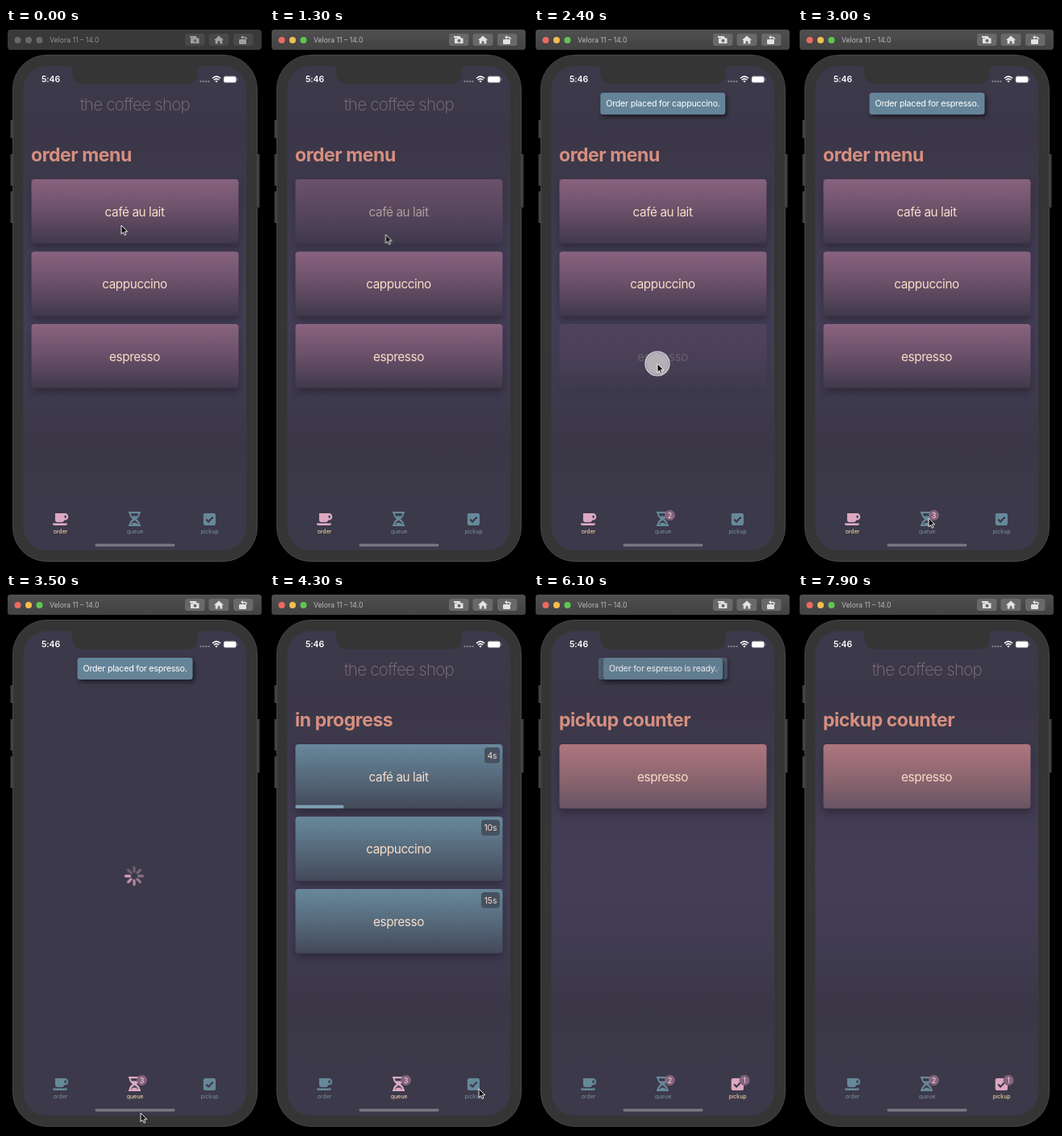
An HTML page for the animation above (8 s loop, 320 by 664 pixels).

```html
<!DOCTYPE html>
<html lang="en">
<head>
<meta charset="utf-8">
<title>the coffee shop</title>
<style>
html, body { margin: 0; width: 100%; height: 100%; overflow: hidden; background: #000; }
body { font-family: Inter, Roboto, sans-serif; }
.stage { position: absolute; left: 0; top: 0; width: 320px; height: 664px; overflow: hidden; }
svg { display: block; }

.brand { font-size: 20.5px; font-weight: 200; letter-spacing: -.7px; fill: #85737f; text-anchor: middle; }
.heading { font-size: 23px; font-weight: 700; letter-spacing: -.45px; fill: #d68f80; }
.card rect { filter: drop-shadow(0 5px 5px rgba(28, 24, 36, .5)); }
.card text { font-size: 15.3px; letter-spacing: -.4px; fill: #f8dcc8; text-anchor: middle; }
.timer rect { fill: #46515f; }
.timer text { font-size: 10.6px; letter-spacing: -.2px; fill: #f3dccb; text-anchor: middle; }
.tab { font-size: 7px; text-anchor: middle; }
.tab .icon { fill: var(--icon); }
.tab text { fill: var(--label); }
.off { --icon: #66899a; --label: #7792a3; }
.on { --icon: #dea8c2; --label: #eab988; }
.badge circle { fill: #85627e; }
.badge text { font-size: 9px; fill: #f6e4dc; text-anchor: middle; }
.toast {
  position: absolute; left: 160px; top: 80px; height: 27px; padding: 0 7px;
  transform: translateX(-50%); border-radius: 3.5px; background: #658498;
  box-shadow: 2px 3px 5px rgba(20, 17, 28, .75);
  font-size: 10.7px; line-height: 27px; letter-spacing: -.24px; white-space: nowrap; color: #fff; opacity: 0;
}

/* hard switches */
.sw { animation: 8s step-end infinite; opacity: 0; }
.focus { animation-name: focus; }
.at-order { animation-name: at-order; }
.at-queue { animation-name: at-queue; }
.at-pickup { animation-name: at-pickup; }
.loading { animation-name: loading; }
.list-queue { animation-name: list-queue; }
.list-pickup { animation-name: list-pickup; }
.one { animation-name: one; }
.two { animation-name: two; }
.three { animation-name: three; }
.queued { animation-name: queued; }
.ready { animation-name: ready; }
.five { animation-name: five; }
.four { animation-name: four; }
.touch { animation-name: touch; }
@keyframes focus { 0% { opacity: 0 } 12.5%, 100% { opacity: 1 } }
@keyframes at-order { 0% { opacity: 1 } 38.75%, 100% { opacity: 0 } }
@keyframes at-queue { 0% { opacity: 0 } 38.75% { opacity: 1 } 56.25%, 100% { opacity: 0 } }
@keyframes at-pickup { 0% { opacity: 0 } 56.25%, 100% { opacity: 1 } }
@keyframes loading { 0%, 47.5% { opacity: 0 } 38.75%, 56.25% { opacity: 1 } 63.75%, 100% { opacity: 0 } }
@keyframes list-queue { 0% { opacity: 0 } 47.5% { opacity: 1 } 56.25%, 100% { opacity: 0 } }
@keyframes list-pickup { 0% { opacity: 0 } 63.75%, 100% { opacity: 1 } }
@keyframes one { 0% { opacity: 0 } 17.5% { opacity: 1 } 26.25%, 100% { opacity: 0 } }
@keyframes two { 0%, 33.75% { opacity: 0 } 26.25%, 73.75%, 100% { opacity: 1 } }
@keyframes three { 0% { opacity: 0 } 33.75% { opacity: 1 } 73.75%, 100% { opacity: 0 } }
@keyframes queued { 0% { opacity: 0 } 17.5%, 100% { opacity: 1 } }
@keyframes ready { 0% { opacity: 0 } 73.75%, 100% { opacity: 1 } }
@keyframes five { 0% { opacity: 1 } 52.5%, 100% { opacity: 0 } }
@keyframes four { 0% { opacity: 0 } 52.5%, 100% { opacity: 1 } }
@keyframes touch {
  0%, 15%, 23.75%, 31.25%, 40% { opacity: 0 }
  12.5%, 21.25%, 28.75%, 38.1%, 55.6% { opacity: 1 }
  57.5%, 100% { opacity: 0 }
}

/* fades and motion */
.press1 { animation: press1 8s linear infinite; }
.press2 { animation: press2 8s linear infinite; }
.press3 { animation: press3 8s linear infinite; }
@keyframes press1 { 0%, 12.5%, 17.5%, 100% { opacity: 1 } 13.75%, 15% { opacity: .2 } }
@keyframes press2 { 0%, 21%, 26.25%, 100% { opacity: 1 } 22.4%, 23.75% { opacity: .2 } }
@keyframes press3 { 0%, 28.5%, 33.75%, 100% { opacity: 1 } 29.9%, 31.25% { opacity: .2 } }

.placed1 { animation: placed1 8s linear infinite; }
.placed2 { animation: placed2 8s linear infinite; }
.placed3 { animation: placed3 8s linear infinite; }
.done1 { animation: done1 8s linear infinite; }
.done2 { animation: done2 8s linear infinite; }
@keyframes placed1 { 0%, 16.25%, 29.5%, 100% { opacity: 0 } 20%, 25% { opacity: 1 } }
@keyframes placed2 { 0%, 25%, 37.5%, 100% { opacity: 0 } 28.75%, 32.5% { opacity: 1 } }
@keyframes placed3 { 0%, 32.5%, 48.75%, 100% { opacity: 0 } 36.25%, 45% { opacity: 1 } }
@keyframes done1 { 0%, 68.75%, 78.75%, 100% { opacity: 0 } 72.5%, 73.75% { opacity: 1 } }
@keyframes done2 { 0%, 73.1%, 87.5%, 100% { opacity: 0 } 77%, 82.5% { opacity: 1 } }

.progress { animation: progress 8s linear infinite; }
@keyframes progress { 0%, 47.5% { width: 31px } 56.25%, 100% { width: 71.5px } }
.spin { animation: spin .8s steps(8) infinite; }
@keyframes spin { to { transform: rotate(360deg) } }

.pointer { animation: move 8s ease-in-out infinite, gone 8s step-end infinite; }
@keyframes move {
  0%, 15% { transform: translate(143px, 244px) }
  20%, 23.75% { transform: translate(146px, 330px) }
  28%, 31.25% { transform: translate(153px, 415px) }
  37.5%, 40% { transform: translate(162px, 606px) }
  43.75% { transform: translate(167px, 643px) }
  46% { transform: translate(170px, 652px) }
  53.75%, 57.5% { transform: translate(259px, 613px) }
  63%, 100% { transform: translate(284px, 648px) }
}
@keyframes gone { 0% { opacity: 1 } 66.25%, 100% { opacity: 0 } }
</style>
</head>
<body>
<div class="stage">
<svg width="320" height="664" viewBox="0 0 320 664">
  <defs>
    <linearGradient id="bar" x2="0" y2="1"><stop stop-color="#505050"/><stop offset="1" stop-color="#424242"/></linearGradient>
    <linearGradient id="plum" x2="0" y2="1"><stop stop-color="#89637f"/><stop offset=".5" stop-color="#694f68"/><stop offset="1" stop-color="#40394b"/></linearGradient>
    <linearGradient id="steel" x2="0" y2="1"><stop stop-color="#68889c"/><stop offset=".5" stop-color="#566a7c"/><stop offset="1" stop-color="#434959"/></linearGradient>
    <linearGradient id="rose" x2="0" y2="1"><stop stop-color="#ae767e"/><stop offset=".5" stop-color="#8d6670"/><stop offset="1" stop-color="#685464"/></linearGradient>
    <linearGradient id="dusk" x2="0" y2="1">
      <stop stop-color="#3c394a"/><stop offset=".12" stop-color="#3b3748"/><stop offset=".34" stop-color="#403b50"/>
      <stop offset=".52" stop-color="#443f57"/><stop offset=".68" stop-color="#413c52"/><stop offset=".86" stop-color="#3b3747"/><stop offset="1" stop-color="#3c394a"/>
    </linearGradient>

    <g id="lens"><path d="M228 10h8v2h-8zM229 12.5h3l1-1.2h3l1 1.2h2.500v6.500h-10.500z"/><circle cx="234.500" cy="15.700" r="2" fill="#666"/></g>
    <g id="home"><path d="M264 9.500l6 5.500h-1.700v4.500h-2.900v-3.200h-2.800v3.200h-2.900V15H258z"/></g>
    <g id="turn"><rect x="289" y="14" width="9" height="6" rx="1"/><path d="M291 11.500l3-2.500v1.700h1.500q3.500 0 3.500 3.300h-1.500q0-1.800-2-1.800H294V14z"/></g>
    <g id="tools"><use href="#lens"/><use href="#home"/><use href="#turn"/></g>
    <g id="keys"><rect x="222" y="7" width="24.500" height="15" rx="3"/><rect x="251.500" y="7" width="25" height="15" rx="3"/><rect x="282" y="7" width="24.500" height="15" rx="3"/></g>

    <g id="tab-order" class="tab">
      <path class="icon" fill-rule="evenodd" d="M61 600H73A4.250 4.250 0 0 1 73 608.500H72.300A3.200 3.200 0 0 1 69.300 611H64.200A3.200 3.200 0 0 1 61 607.800ZM72.500 602.400V606.100H73.200A1.850 1.850 0 0 0 73.200 602.400ZM58 612.500H76C76 614.300 75 615 73.500 615H60.500C59 615 58 614.300 58 612.500Z"/>
      <text x="67.500" y="625">order</text>
    </g>
    <g id="tab-queue" class="tab">
      <path class="icon" fill-rule="evenodd" d="M152 598H167V600.300H166C166 604.500 163 606 162 607.200C163 608.500 166 610 166 613.700H167V616H152V613.700H153C153 610 156 608.500 157 607.200C156 606 153 604.500 153 600.300H152ZM155 600.300C155 602 155.300 602.800 156 603.600H163C163.700 602.800 164 602 164 600.300ZM155.200 613.700H156.200L157 611.800H162L162.800 613.700H163.800C163.800 611.500 161.500 610.200 159.500 608.600C157.500 610.200 155.200 611.500 155.200 613.700Z"/>
      <text x="160" y="625">queue</text>
    </g>
    <g id="tab-pickup" class="tab">
      <rect class="icon" x="244.800" y="600" width="15.200" height="15" rx="2.300"/>
      <path d="M248.200 607.600l2.900 2.900 5.600-5.800" fill="none" stroke="#3b3849" stroke-width="2.100"/>
      <text x="252.500" y="625">pickup</text>
    </g>
    <path id="spoke" d="M5.500 0H10.500" stroke="#dfabc8" stroke-width="3" stroke-linecap="round"/>
  </defs>

  <!-- window bar -->
  <rect x="2" y="2" width="315" height="25" rx="4" fill="#393939"/>
  <g fill="#686868"><circle cx="14.500" cy="15" r="4"/><circle cx="28" cy="15" r="4"/><circle cx="41.500" cy="15" r="4"/></g>
  <use href="#keys" fill="#494949"/>
  <use href="#tools" fill="#a0a0a0"/>
  <text x="54" y="18" font-size="8.700" fill="#929292">Velora 11 – 14.0</text>
  <g class="sw focus">
    <rect x="2" y="2" width="315" height="25" rx="4" fill="url(#bar)"/>
    <circle cx="14.500" cy="15" r="4" fill="#ec6a5e"/><circle cx="28" cy="15" r="4" fill="#f4be4f"/><circle cx="41.500" cy="15" r="4" fill="#5fc453"/>
    <use href="#keys" fill="#696969"/>
    <use href="#tools" fill="#e2e2e2"/>
    <text x="54" y="18" font-size="8.700" fill="#bababa">Velora 11 – 14.0</text>
  </g>

  <!-- handset -->
  <path d="M7 114v22M7 156v39M7 202v39M313 156v66" stroke="#404040" stroke-width="3"/>
  <rect x="8.500" y="33.500" width="303" height="626" rx="42" fill="#353535" stroke="#484848"/>
  <rect x="21.500" y="47" width="276.500" height="599" rx="29" fill="#3c394a"/>
  <path d="M78 46V47Q82 47 82 52V54Q82 69.500 97 69.500H223Q238 69.500 238 54V52Q238 47 242 47V46Z" fill="#353535"/>

  <text x="44" y="67" font-size="10.500" font-weight="600" fill="#fff" letter-spacing="-.100">5:46</text>
  <path d="M240.500 66h12" stroke="#85828f" stroke-width="1.800" stroke-dasharray="2 1.400"/>
  <path d="M256 62.200q5-4.600 10 0M257.800 64.300q3.200-2.800 6.400 0" fill="none" stroke="#fff" stroke-width="1.500"/>
  <path d="M259.300 65.700q1.700-1.300 3.400 0l-1.700 1.900z" fill="#fff"/>
  <rect x="270" y="59.800" width="15.500" height="7.600" rx="2" fill="#fff" stroke="#8d8a96" stroke-width=".600"/>
  <path d="M286.700 62.200v2.800" stroke="#8d8a96"/>

  <!-- order page -->
  <g class="sw at-order">
    <rect x="21.500" y="72" width="276.500" height="513" fill="url(#dusk)"/>
    <text class="brand" x="160" y="101.500">the coffee shop</text>
    <text class="heading" x="31" y="165">order menu</text>
    <g class="card" transform="translate(31.500 187)"><g class="press1"><rect width="257" height="79.500" rx="4" fill="url(#plum)"/><text x="128" y="45.500">café au lait</text></g></g>
    <g class="card" transform="translate(31.500 276.500)"><g class="press2"><rect width="257" height="79.500" rx="4" fill="url(#plum)"/><text x="128" y="45.500">cappuccino</text></g></g>
    <g class="card" transform="translate(31.500 366)"><g class="press3"><rect width="257" height="79.500" rx="4" fill="url(#plum)"/><text x="128" y="45.500">espresso</text></g></g>
  </g>

  <!-- queue page -->
  <g class="sw list-queue">
    <rect x="21.500" y="72" width="276.500" height="513" fill="url(#dusk)"/>
    <text class="brand" x="160" y="101.500">the coffee shop</text>
    <text class="heading" x="31" y="165">in progress</text>
    <g class="card" transform="translate(31.500 187)"><rect width="257" height="79.500" rx="4" fill="url(#steel)"/><text x="128" y="45.500">café au lait</text></g>
    <rect class="progress" x="31.500" y="262.300" height="4" rx="1.500" fill="#7da0b2"/>
    <g class="card" transform="translate(31.500 276.500)"><rect width="257" height="79.500" rx="4" fill="url(#steel)"/><text x="128" y="45.500">cappuccino</text></g>
    <g class="card" transform="translate(31.500 366)"><rect width="257" height="79.500" rx="4" fill="url(#steel)"/><text x="128" y="45.500">espresso</text></g>
    <g class="timer">
      <rect x="266" y="191" width="19" height="19.500" rx="4"/>
      <text class="sw five" x="275.500" y="204.600">5s</text><text class="sw four" x="275.500" y="204.600">4s</text>
      <rect x="262" y="280.500" width="23" height="19.500" rx="4"/><text x="273.500" y="294.100">10s</text>
      <rect x="262" y="370" width="23" height="19.500" rx="4"/><text x="273.500" y="383.600">15s</text>
    </g>
  </g>

  <!-- pickup page -->
  <g class="sw list-pickup">
    <rect x="21.500" y="72" width="276.500" height="513" fill="url(#dusk)"/>
    <text class="brand" x="160" y="101.500">the coffee shop</text>
    <text class="heading" x="31" y="165">pickup counter</text>
    <g class="sw ready"><g class="card" transform="translate(31.500 187)"><rect width="257" height="79.500" rx="4" fill="url(#rose)"/><text x="128" y="45.500">espresso</text></g></g>
  </g>

  <g class="sw loading"><g transform="translate(159 350)"><g class="spin">
    <use href="#spoke" transform="rotate(45)"/>
    <use href="#spoke" opacity=".870"/>
    <use href="#spoke" transform="rotate(315)" opacity=".750"/>
    <use href="#spoke" transform="rotate(270)" opacity=".620"/>
    <use href="#spoke" transform="rotate(225)" opacity=".500"/>
    <use href="#spoke" transform="rotate(180)" opacity=".420"/>
    <use href="#spoke" transform="rotate(135)" opacity=".350"/>
    <use href="#spoke" transform="rotate(90)" opacity=".350"/>
  </g></g></g>

  <!-- tab bar -->
  <g class="off"><use href="#tab-order"/><use href="#tab-queue"/><use href="#tab-pickup"/></g>
  <g class="on">
    <use class="sw at-order" href="#tab-order"/>
    <use class="sw at-queue" href="#tab-queue"/>
    <use class="sw at-pickup" href="#tab-pickup"/>
  </g>
  <g class="badge sw queued">
    <circle cx="168.500" cy="602.500" r="6.500"/>
    <text class="sw one" x="168.500" y="605.700">1</text>
    <text class="sw two" x="168.500" y="605.700">2</text>
    <text class="sw three" x="168.500" y="605.700">3</text>
  </g>
  <g class="badge sw ready"><circle cx="261" cy="602.500" r="6.500"/><text x="261" y="605.700">1</text></g>
  <rect x="110.500" y="637.800" width="99" height="3.400" rx="1.700" fill="#77757f"/>

  <g class="pointer">
    <g class="sw touch"><circle r="15" fill="#bebabf" fill-opacity=".92" stroke="#dedbe0" stroke-width="1.200"/><circle r="13.800" fill="none" stroke="#8d8991" stroke-width=".600"/></g>
    <path d="M0 0V10.800L2.500 8.500 4.200 12.300 6 11.500 4.400 7.800H7.800Z" fill="#111" stroke="#fff" stroke-width=".900"/>
  </g>
</svg>
<div class="toast placed1">Order placed for café au lait.</div>
<div class="toast placed2">Order placed for cappuccino.</div>
<div class="toast placed3">Order placed for espresso.</div>
<div class="toast done1">Order for cappuccino is ready.</div>
<div class="toast done2">Order for espresso is ready.</div>
</div>
</body>
</html>
```
